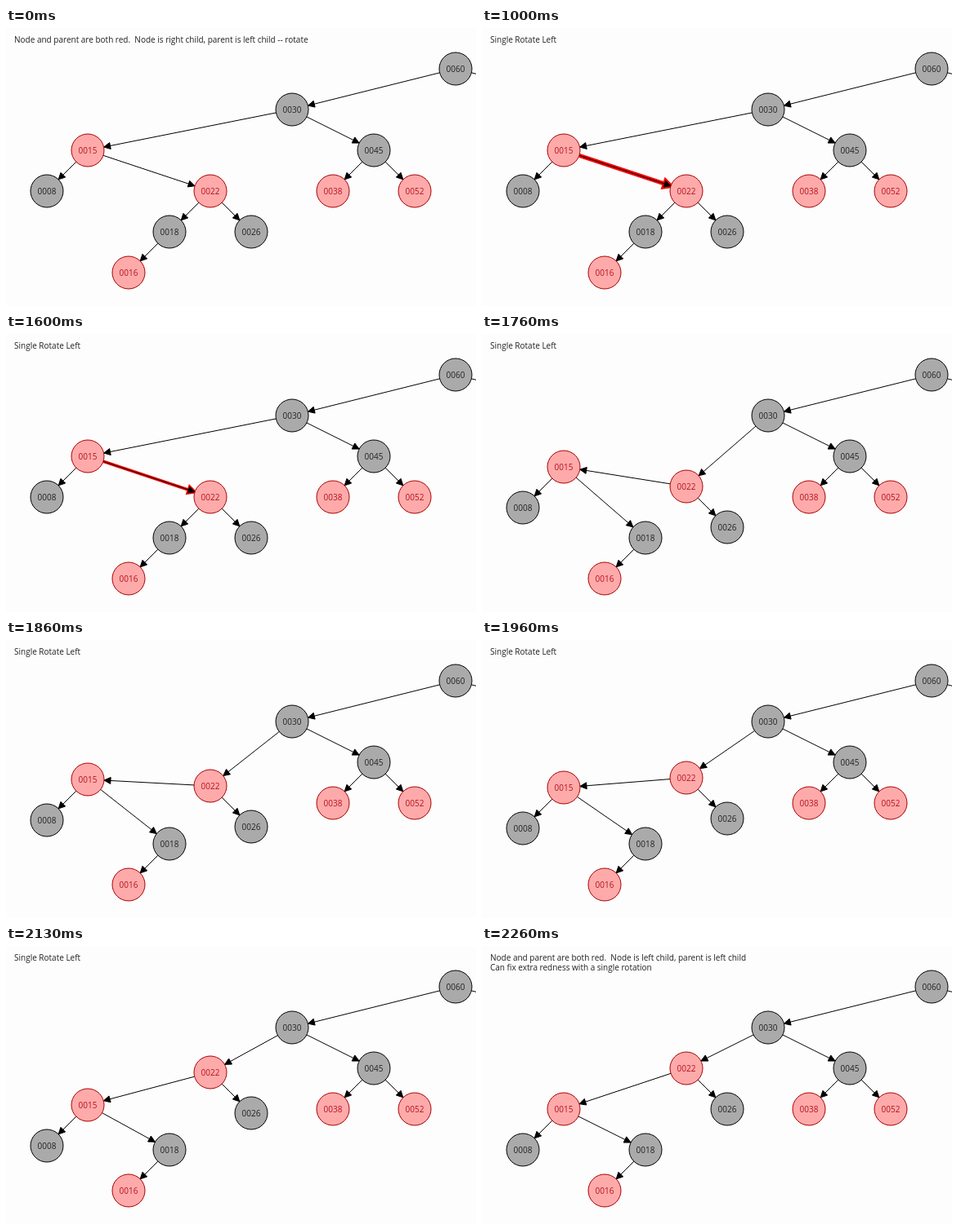
An HTML page with a canvas for the animation above (3260 ms loop, 575 by 341 pixels).

```html
<!DOCTYPE html>
<html lang="en">
<head>
<meta charset="utf-8">
<title>Tree rotation</title>
<style>
html, body { margin: 0; width: 100%; height: 100%; overflow: hidden; background: #fdfdfe; }
canvas { display: block; }
</style>
</head>
<body>
<canvas id="stage" width="575" height="341"></canvas>
<script>
const ctx = document.getElementById('stage').getContext('2d');
const LOOP = 3260, R = 20;
const GREY = { fill: '#aaaaaa', line: '#000000', text: '#222222' };
const RED = { fill: '#ffaaaa', line: '#aa0000', text: '#b01420' };

// key: x, y, colours, vertical travel during the rotation
const nodes = {
  60: [550, 50, GREY, 0],
  30: [350, 100, GREY, 0],
  45: [450, 150, GREY, 0],
  38: [400, 200, RED, 0],
  52: [500, 200, RED, 0],
  15: [100, 150, RED, 50],
  8: [50, 200, GREY, 50],
  22: [250, 200, RED, -50],
  18: [200, 250, GREY, 0],
  26: [300, 250, GREY, -50],
  16: [150, 300, RED, 0],
  75: [750, 100, GREY, 0]
};
const shared = [[60, 30], [60, 75], [30, 45], [45, 38], [45, 52], [15, 8], [22, 26], [18, 16]];
const before = [...shared, [30, 15], [15, 22], [22, 18]];
const after = [...shared, [30, 22], [22, 15], [15, 18]];

const intro = ['Node and parent are both red.  Node is right child, parent is left child -- rotate'];
const rotating = ['Single Rotate Left'];
const outro = ['Node and parent are both red.  Node is left child, parent is left child',
  'Can fix extra redness with a single rotation'];

// [step, progress]
const pace = [[18.4, 0], [23, 0.26], [26, 0.42], [31, 0.74], [35.6, 1]];

function progress(step) {
  if (step <= pace[0][0]) return 0;
  for (let i = 1; i < pace.length; i++) {
    const [s0, p0] = pace[i - 1], [s1, p1] = pace[i];
    if (step <= s1) return p0 + (p1 - p0) * (step - s0) / (s1 - s0);
  }
  return 1;
}

function arrow(a, b, color, width) {
  const dx = b.x - a.x, dy = b.y - a.y, d = Math.hypot(dx, dy);
  const ux = dx / d, uy = dy / d;
  const x = b.x - ux * R, y = b.y - uy * R;
  ctx.strokeStyle = ctx.fillStyle = color;
  ctx.lineWidth = width;
  ctx.beginPath();
  ctx.moveTo(a.x + ux * R, a.y + uy * R);
  ctx.lineTo(x, y);
  ctx.stroke();
  ctx.beginPath();
  ctx.moveTo(x, y);
  ctx.lineTo(x - ux * 8 - uy * 4, y - uy * 8 + ux * 4);
  ctx.lineTo(x - ux * 8 + uy * 4, y - uy * 8 - ux * 4);
  ctx.closePath();
  ctx.fill();
  ctx.stroke();
}

function circle({ x, y, look }, key) {
  ctx.beginPath();
  ctx.arc(x, y, R, 0, Math.PI * 2);
  ctx.fillStyle = look.fill;
  ctx.fill();
  ctx.strokeStyle = look.line;
  ctx.lineWidth = 1;
  ctx.stroke();
  ctx.fillStyle = look.text;
  ctx.textAlign = 'center';
  ctx.fillText(key.padStart(4, '0'), x, y + 3.5);
}

function draw(t) {
  // the picture advances thirty times a second, on whole hundredths
  const step = Math.floor((Math.floor((t - 1000) / 10) * 10 + 9) * 0.03);
  const p = progress(step);
  const at = {};
  for (const key in nodes) {
    const [x, y, look, dy] = nodes[key];
    at[key] = { x, y: Math.round(y + dy * p), look };
  }

  ctx.fillStyle = '#fdfdfe';
  ctx.fillRect(0, 0, 575, 341);
  ctx.font = '10px "Open Sans", "Noto Sans", sans-serif';

  if (t >= 1000 && !p) arrow(at[15], at[22], '#f00', 5 - 1.4 * step / 18);
  for (const [a, b] of p ? after : before) arrow(at[a], at[b], '#000', 1);
  for (const key in at) circle(at[key], key);

  ctx.textAlign = 'left';
  ctx.fillStyle = '#222';
  const lines = t < 1000 ? intro : t < 2260 ? rotating : outro;
  lines.forEach((line, i) => ctx.fillText(line, 10, 18 + 12 * i));
}

const start = performance.now();
function tick() {
  draw((performance.now() - start) % LOOP);
  requestAnimationFrame(tick);
}
tick();
</script>
</body>
</html>
```
